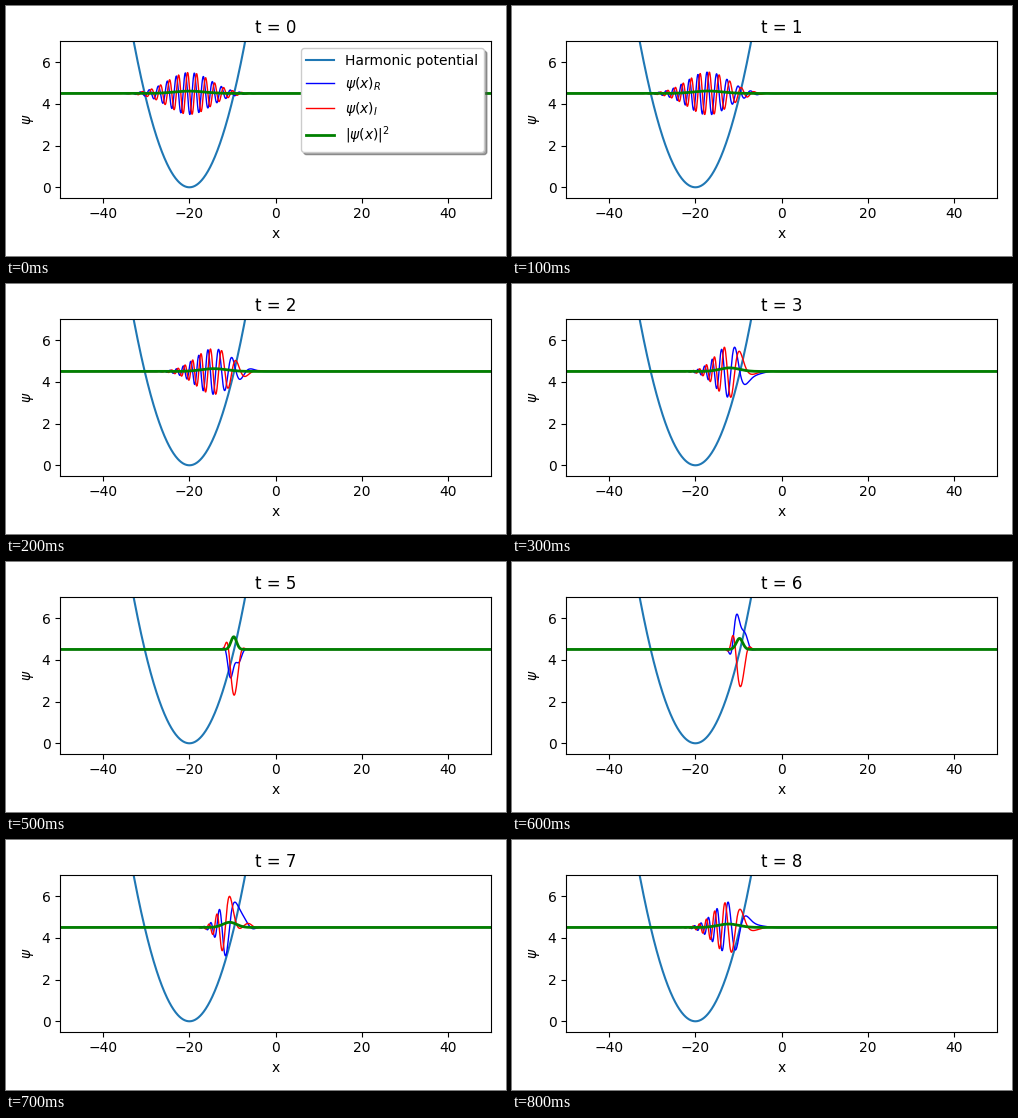
These frames come from a looping animation (500 by 250 pixels, 1000 ms). A matplotlib script:

```python
import numpy as np
import matplotlib.pyplot as plt
from matplotlib.animation import FuncAnimation

WIDTH, HEIGHT, DPI = 500, 250, 100
K = 3.0             # initial wave number
SIGMA = 5.0         # initial packet width
OMEGA = 0.2892      # oscillator frequency
X_MIN = -20.0       # bottom of the well
ENERGY = K**2 / 2   # baseline of the wave curves
SCALE = 3.0
LAST_T = 8
TOP_MARGIN = 35.33  # pixels above the axes

x = np.linspace(-50, 50, 1001)


def psi(t):
    """Exact Gaussian packet in a harmonic well (hbar = m = 1)."""
    c, s = np.cos(OMEGA * t), np.sin(OMEGA * t)
    b = 1 / (OMEGA * SIGMA**2)
    spread = c + 1j * b * s
    alpha = OMEGA * (b * c + 1j * s) / spread
    center, p = K / OMEGA * s, K * c
    u = x - X_MIN - center
    norm = (np.pi * SIGMA**2) ** -0.25 / np.sqrt(spread)
    phase = K * X_MIN + p * u + p * center / 2
    return norm * np.exp(-alpha / 2 * u**2 + 1j * phase)


fig, ax = plt.subplots(figsize=(WIDTH / DPI, HEIGHT / DPI), dpi=DPI)
ax.plot(x, 0.5 * OMEGA**2 * (x - X_MIN) ** 2, label="Harmonic potential")
real_line, = ax.plot([], [], "b", lw=1, label=r"$\psi(x)_R$")
imag_line, = ax.plot([], [], "r", lw=1, label=r"$\psi(x)_I$")
prob_line, = ax.plot([], [], "g", lw=2, label=r"$|\psi(x)|^2$")
ax.set_xlim(-50, 50)
ax.set_ylim(-0.5, 7)
ax.set_xlabel("x")
ax.set_ylabel(r"$\psi$")
title = ax.set_title("t = 0")
legend = ax.legend(loc="upper right", shadow=True, fancybox=True)
fig.tight_layout()
fig.subplots_adjust(top=1 - TOP_MARGIN / HEIGHT)


def update(i):
    t = min(i, LAST_T)
    wave = psi(t)
    real_line.set_data(x, ENERGY + SCALE * wave.real)
    imag_line.set_data(x, ENERGY + SCALE * wave.imag)
    prob_line.set_data(x, ENERGY + np.abs(wave) ** 2)
    title.set_text(f"t = {t}")
    legend.set_visible(t == 0)
    return real_line, imag_line, prob_line, title, legend


anim = FuncAnimation(fig, update, frames=10, interval=100,
                     repeat=True, repeat_delay=0, blit=False)
plt.show()
```
